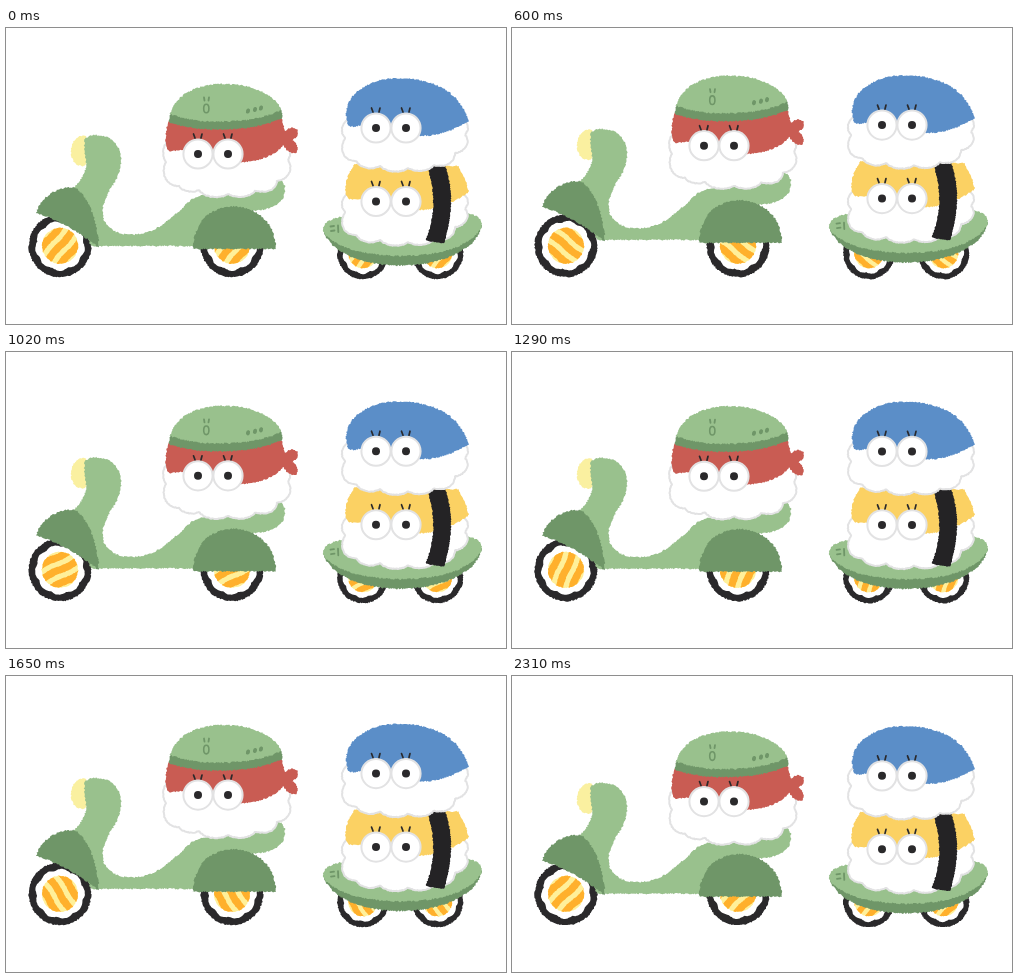
These frames come from a looping animation (500 by 296 pixels, 2.34 s). An HTML page with a canvas:

```html
<!DOCTYPE html>
<html lang="en">
<head>
<meta charset="utf-8">
<title>Sushi ride</title>
<style>
  html, body { margin: 0; width: 100%; height: 100%; overflow: hidden; background: #fff; }
  canvas { display: block; }
  svg { position: absolute; width: 0; height: 0; }
</style>
</head>
<body>
<canvas id="stage" width="500" height="296"></canvas>
<svg aria-hidden="true"><path id="probe"/></svg>
<script>
const LOOP = 2340, STEP = 30, TAU = Math.PI * 2;
const GREEN = '#99c18d', MOSS = '#6f9668', INK = '#2a292b', GREY = '#e2e2e3';
const ctx = document.getElementById('stage').getContext('2d');
const probe = document.getElementById('probe');

let seed = 7;
const random = () => (seed = (seed * 16807) % 2147483647) / 2147483647;
const jitter = amount => (random() * 2 - 1) * amount;

// Turns a smooth outline into one with a furry, crayon-like edge.
function fuzzy(d, amount = 0.75) {
  probe.setAttribute('d', d);
  const length = probe.getTotalLength(), path = new Path2D();
  for (let s = 0; s < length; s += 1.1) {
    const a = probe.getPointAtLength(s);
    const b = probe.getPointAtLength(Math.min(s + 0.5, length));
    const dx = b.x - a.x, dy = b.y - a.y;
    const k = jitter(amount) / (Math.hypot(dx, dy) || 1);
    path.lineTo(a.x - dy * k, a.y + dx * k);
  }
  path.closePath();
  return path;
}

function disc(radius, amount, bump = 0) {
  const path = new Path2D(), count = Math.round(radius * 5);
  for (let i = 0; i < count; i++) {
    const a = i / count * TAU;
    const r = radius + bump * Math.abs(Math.sin(a * 4.5)) + jitter(amount);
    path.lineTo(r * Math.cos(a), r * Math.sin(a));
  }
  path.closePath();
  return path;
}

function wavyStripe(y) {
  const path = new Path2D();
  const edge = (x, side) => path.lineTo(x, y + side + Math.sin(x * 0.2 + y) * 0.7 + jitter(0.3));
  for (let x = -20; x <= 20; x++) edge(x, -3.7);
  for (let x = 20; x >= -20; x--) edge(x, 3.7);
  path.closePath();
  return path;
}

const tyre = disc(31.3, 0.6), rice = disc(23, 0.3, 2), yolk = disc(18, 0.4);
const stripes = [-12.5, 0, 12.5].map(wavyStripe);

const scooter = {
  lamp: fuzzy('M80,108 C70,107 65,114 65,123 C65,133 70,139 79,138 L86,122Z', 0.6),
  body: fuzzy('M79,111 C86,104 104,106 112,119 C119,133 114,145 107,157 C97,172 92,187 102,198 ' +
    'C112,209 130,208 145,203 C163,195 175,180 189,169 L270,150 C280,152 281,162 276,172 ' +
    'C269,182 250,183 240,183 L200,218 L85,218 L62,165 C72,156 81,146 80,134 C79,126 77,118 79,111Z'),
  frontGuard: fuzzy('M30,185 C35,171 48,158 69,159.5 C84,170 92,195 93,220 C79,209 60,194 30,185Z'),
  rearGuard: fuzzy('M187,221 C188,193 204,179 228,178.5 C252,179 269,195 270,221Z')
};

const rider = {
  rice: fuzzy('M165,110 C157,115 155,127 160,134 C155,143 158,158 173,158 C177,164 187,165 193,162 ' +
    'C199,170 214,171 222,166 C231,171 244,169 249,163 C259,165 270,163 271,153 ' +
    'C282,152 288,141 282,132 C288,122 280,112 272,112Z', 0.35),
  band: fuzzy('M163,93 L275,89 L279,103 C284,98 290,99 292,103 C293,108 289,110 287,112 ' +
    'C291,116 293,121 290,125 C284,127 280,122 277,117 C270,127 253,134 235,134 L205,126 ' +
    'L178,122 C174,122 168,123 165,123 C161,123 159,118 160,108 C160,102 161,97 163,93Z', 0.65),
  brim: fuzzy('M165,84 L275,80 L276.5,90 C258,98.5 238,101.5 218,101.5 C197,102 178,99.5 162.5,94Z'),
  dome: fuzzy('M164,86 C170,65 193,56 218,56 C247,56 269,67 275.5,82 C260,89.5 239,93.5 218,93.5 C197,94 178,91.5 164,86Z')
};

const side = {
  under: fuzzy('M317,200 C319,217 344,237.5 396,237.5 C443,237 474,217 476,196Z'),
  deck: fuzzy('M317,203 C316,193 328,189 345,188 L455,184 C468,185 476,190 476,198 ' +
    'C470,213 444,227.5 396,228 C350,228 323,215 317,203Z'),
  topping: fuzzy('M349,136 L452,138 C457,146 461,155 463,164 C450,173 433,182 414,182 L385,174 ' +
    'L362,171 C356,171 350,172 346,171.5 C341,171 339,167 339.5,160 C340,150 344,142 349,136Z', 0.65),
  nori: fuzzy('M421,138 L439.5,138 C447,159 447,188 438,215 C431,215 426,214 419.5,212 C430,188 429,161 421,138Z', 0.5),
  fish: fuzzy('M344,98.5 C337,93 339,72 352,63 C364,53 379,50.5 394,50.5 C430,51 453,64 463,93 ' +
    'C449,102 433,108 414,108 L385,100 L361,97 C355,97 349,99 344,98.5Z')
};
const riceBlock = fuzzy('M345,91 C336,93 333,103 339,110 C333,120 336,133 350,133 ' +
  'C355,141 368,142 374,138 C380,144 394,146 402,140 C411,145 424,143 428,137 ' +
  'C438,140 449,135 449,125 C460,124 465,113 459,107 C465,99 461,91 452,91Z', 0.35);

function fill(path, color) {
  ctx.fillStyle = color;
  ctx.fill(path);
}

function outlined(path) {
  fill(path, '#fff');
  ctx.strokeStyle = GREY;
  ctx.lineWidth = 2;
  ctx.stroke(path);
}

function oval(x, y, rx, ry, tilt = 0) {
  const path = new Path2D();
  path.ellipse(x, y, rx, ry, tilt, 0, TAU);
  return path;
}

function line(x1, y1, x2, y2, color, width) {
  ctx.strokeStyle = color;
  ctx.lineWidth = width;
  ctx.beginPath();
  ctx.moveTo(x1, y1);
  ctx.lineTo(x2, y2);
  ctx.stroke();
}

function shifted(x, y, draw) {
  ctx.save();
  ctx.translate(x, y);
  draw();
  ctx.restore();
}

function wheel(x, y, scale, angle) {
  shifted(x, y, () => {
    ctx.scale(scale, scale);
    ctx.rotate(angle);
    fill(tyre, INK);
    fill(rice, '#fff');
    fill(yolk, '#fff09a');
    ctx.clip(yolk);
    stripes.forEach(stripe => fill(stripe, '#ffb02c'));
  });
}

function eyes(x, y) {
  for (const cx of [x, x + 30]) {
    outlined(oval(cx, y, 14.6, 14.6));
    fill(oval(cx, y, 4, 4), INK);
    line(cx - 4.5, y - 20, cx - 3, y - 16, INK, 1.7);
    line(cx + 4, y - 20, cx + 3, y - 16, INK, 1.7);
  }
}

function drawScooter() {
  fill(scooter.lamp, '#faf0a0');
  fill(scooter.body, GREEN);
  fill(scooter.frontGuard, MOSS);
  fill(scooter.rearGuard, MOSS);
}

function drawRider() {
  outlined(rider.rice);
  fill(rider.band, '#c95c53');
  fill(rider.brim, MOSS);
  fill(rider.dome, GREEN);
  line(198, 69.5, 198.5, 72.5, MOSS, 1.8);
  line(203, 69.5, 202.5, 72.5, MOSS, 1.8);
  ctx.lineWidth = 1.6;
  ctx.stroke(oval(200.3, 80.5, 2.6, 4.3));
  fill(oval(242, 83, 2, 2.6, 0.3), MOSS);
  fill(oval(249, 81.5, 2, 2.6, 0.3), MOSS);
  fill(oval(255, 80, 2, 2.6, 0.3), MOSS);
  eyes(192, 126);
}

function drawSide() {
  fill(side.under, MOSS);
  fill(side.deck, GREEN);
  line(324.5, 198.5, 328, 198, MOSS, 1.8);
  line(325, 203, 328.5, 202.5, MOSS, 1.8);
  line(332, 197.5, 332.3, 204, MOSS, 1.8);
  shifted(0, 74, () => outlined(riceBlock));
  fill(side.topping, '#fbd163');
  fill(side.nori, '#242325');
  eyes(370, 173.5);
  outlined(riceBlock);
  fill(side.fish, '#5b8ec8');
  eyes(370, 100);
}

function render(now) {
  const time = Math.floor((now % LOOP) / STEP) * STEP;
  const turn = time / LOOP;
  const lift = 1 - Math.abs(1 - (turn * 4) % 2);
  const angle = -(50 / 360 + turn) * TAU;

  ctx.fillStyle = '#fff';
  ctx.fillRect(0, 0, 500, 296);
  ctx.lineCap = ctx.lineJoin = 'round';
  wheel(54, 217.8, 1, angle);
  wheel(226, 217.8, 1, angle);
  wheel(357, 225.5, 0.82, angle);
  wheel(431.5, 225.5, 0.82, angle);
  shifted(0, -6.3 * lift, drawScooter);
  shifted(0, -8.5 * lift, drawRider);
  shifted(0, -3 * lift, drawSide);
}

let start;
function tick(now) {
  start ??= now;
  render(now - start);
  requestAnimationFrame(tick);
}
render(0);
requestAnimationFrame(tick);
</script>
</body>
</html>
```
